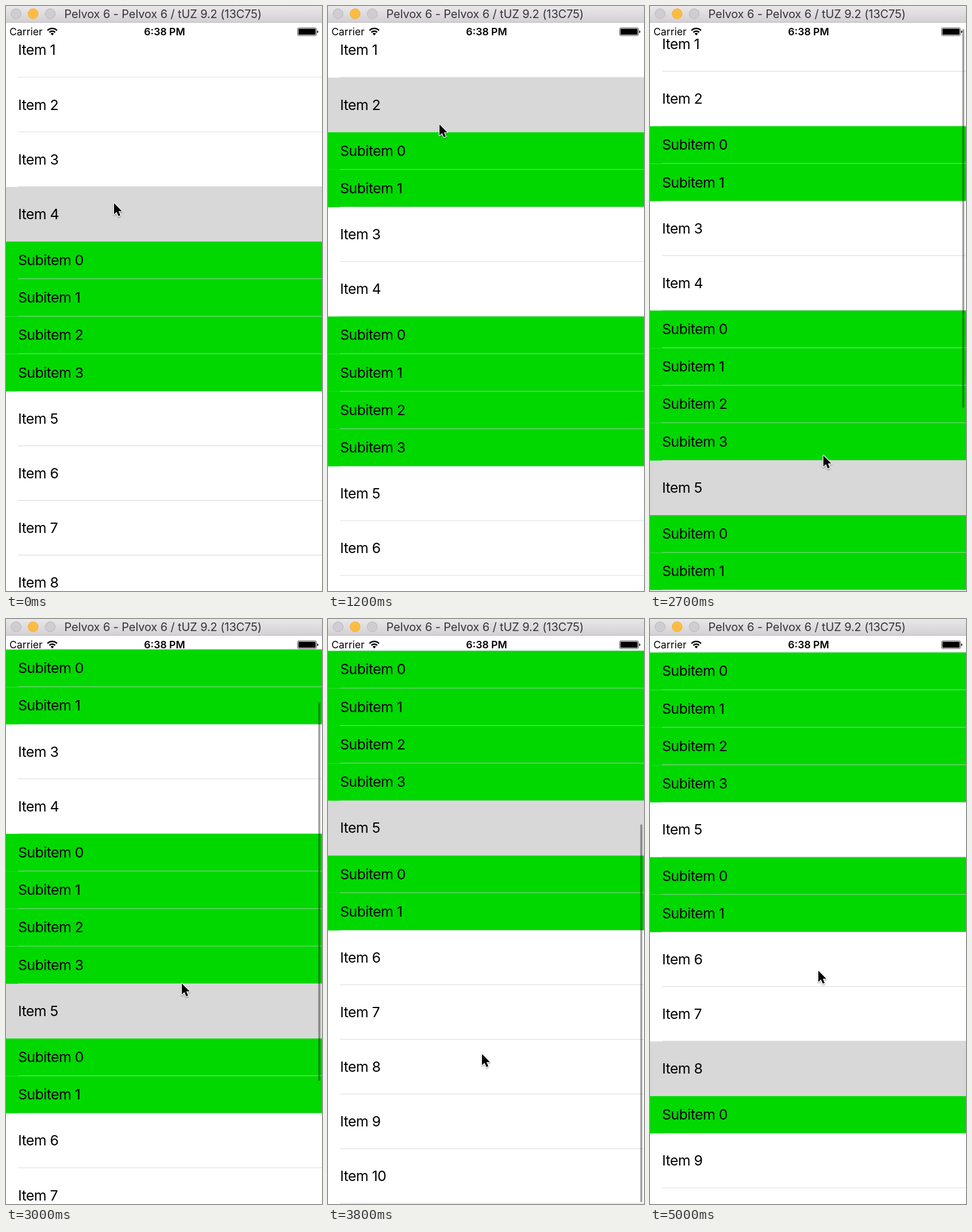
Animation of 550 by 1018 pixels, one loop 5100 ms. Source, as an HTML page:

```html
<!DOCTYPE html>
<html lang="en">
<head>
<meta charset="utf-8">
<title>Expandable list</title>
<style>
  html, body { margin: 0; width: 100%; height: 100%; overflow: hidden; background: #fff; }
  svg { display: block; width: 100%; height: 100%; }
  text { font-family: Inter, "Open Sans", sans-serif; }
  #list text { font-size: 24.9px; letter-spacing: -.54px; }
  .status { font-size: 17.6px; }
</style>
</head>
<body>
<svg viewBox="0 0 550 1018">
  <defs>
    <linearGradient id="bar" x2="0" y2="1">
      <stop offset="0" stop-color="#e9e7e9"/>
      <stop offset="1" stop-color="#d2d0d2"/>
    </linearGradient>
    <clipPath id="screen"><rect y="29" width="550" height="989"/></clipPath>
    <filter id="shadow" x="-50%" y="-50%" width="200%" height="200%">
      <feDropShadow dx="0" dy="1.5" stdDeviation="1.3" flood-opacity=".4"/>
    </filter>
  </defs>
  <rect width="550" height="1018" fill="#fff"/>
  <g clip-path="url(#screen)">
    <g id="list"></g>
    <rect id="thumb" x="543.5" width="3.6" rx="1.8" fill="#000" fill-opacity=".37"/>
  </g>

  <text class="status" x="6" y="51">Carrier</text>
  <g fill="none" stroke="#000" stroke-width="2.5">
    <path d="M72.2 42.6a11.6 11.6 0 0 1 16.6 0M75.5 45.9a7 7 0 0 1 10 0"/>
    <path d="M77.6 48.1a4.1 4.1 0 0 1 5.8 0L80.5 51.2z" fill="#000" stroke="none"/>
  </g>
  <text class="status" x="276" y="51" text-anchor="middle" font-weight="600">6:38 PM</text>
  <rect x="507.4" y="38" width="33" height="13.6" rx="2.6" fill="none" stroke="#000" stroke-opacity=".7"/>
  <rect x="508.9" y="39.5" width="30" height="10.6" rx="1.3"/>
  <path d="M541.6 42.4q2 .6 2 2.4t-2 2.4z"/>

  <rect width="550" height="29" fill="url(#bar)"/>
  <rect y="28" width="550" height="1" fill="#b9b7b9"/>
  <g fill="#cfcdcf" stroke="#b8b6b8">
    <circle cx="17.5" cy="13.5" r="8.7"/>
    <circle cx="47.2" cy="13.5" r="8.7" fill="#fdbc40" stroke="#f0b03e"/>
    <circle cx="77" cy="13.5" r="8.7"/>
  </g>
  <text x="273.3" y="21" text-anchor="middle" font-size="20" letter-spacing="-.12" fill="#363436">Pelvox 6 - Pelvox 6 / tUZ 9.2 (13C75)</text>

  <path id="cursor" d="M1 1V20.4L5.5 16.2L8.7 23.6L12 22.2L8.9 14.9H14.8Z" stroke="#fff" stroke-width="2.4"
    stroke-linejoin="round" paint-order="stroke" filter="url(#shadow)"/>
</svg>
<script>
const LOOP = 5100, STEP = 100;
const ITEM = 95.07, SUB = 65.27, TOP = 29.5, END = 482;
const list = document.getElementById('list');
const thumb = document.getElementById('thumb');
const cursor = document.getElementById('cursor');

// Item number -> count of subitems and the time they open
const subs = {
  2: { count: 2, at: 850 },
  4: { count: 4, at: -1000 },
  5: { count: 2, at: 2029 },
  8: { count: 1, at: 4425 }
};
// Taps: time, item
const taps = [[0, 4], [800, 2], [2000, 5], [4400, 8]];
// Pointer: time, x, y
const path = [
  [0, 187, 342], [150, 187, 342], [700, 193, 205], [1250, 193, 205],
  [1800, 267, 867], [2350, 267, 867], [2600, 300, 791], [3000, 305, 633],
  [3300, 307, 394], [3400, 307, 372], [3800, 267, 756], [4500, 270, 768], [5000, 292, 611]
];

const clamp = v => Math.min(1, Math.max(0, v));
const ease = v => (1 - Math.cos(Math.PI * clamp(v))) / 2;

// Accelerating drag, steady flick, then a critically damped bounce at the end
function scrollAt(t) {
  if (t < 2600) return 0;
  if (t < 3000) return 166.5 * ((t - 2600) / 400) ** 2;
  const hit = 3000 + (END - 166.5) / .841;
  if (t < hit) return 166.5 + .841 * (t - 3000);
  const d = t - hit;
  return END + .841 * d * Math.exp(-.01135 * d);
}

function pointerAt(t, scroll) {
  let i = 0;
  while (i < path.length - 2 && path[i + 1][0] <= t) i++;
  const [t0, x0, y0] = path[i], [t1, x1, y1] = path[i + 1];
  const k = ease((t - t0) / (t1 - t0));
  const dragging = t >= 2600 && t <= 3300;
  return [x0 + (x1 - x0) * k, dragging ? 791 - .948 * scroll : y0 + (y1 - y0) * k];
}

function row(label, y, h, { fill = '#fff', alpha = 1, picked = false } = {}) {
  if (y > 1018 || y + h < 29) return '';
  const line = picked ? '' :
    `<rect x="21" y="${y + h - 1}" width="529" height="1" fill="#c8c7cc" opacity=".8"/>`;
  return `<g opacity="${alpha}"><rect y="${y}" width="550" height="${h}" fill="${fill}"/>` +
    `${line}<text x="20.9" y="${y + h / 2 + 8.4}">${label}</text></g>`;
}

function drawList(t, scroll) {
  const picked = taps.filter(tap => tap[0] <= t).pop()[1];
  let y = TOP - scroll, rows = '', opening = '';
  for (let n = 1; n <= 10; n++) {
    const on = n === picked;
    rows += row('Item ' + n, y, ITEM, { fill: on ? '#d8d8d8' : '#fff', picked: on });
    y += ITEM;
    if (!subs[n]) continue;
    const { count, at } = subs[n], p = ease((t - at) / 300);
    for (let k = 0; k < count && p > 0; k++) {
      const cell = row('Subitem ' + k, y + k * SUB * p, SUB, { fill: '#00d800', alpha: p });
      if (p < 1) opening += cell; else rows += cell;
    }
    y += count * SUB * p;
  }
  list.innerHTML = rows + opening;
}

function draw(t) {
  const scroll = scrollAt(t);
  drawList(t, scroll);
  const top = 33 + .669 * scroll;
  thumb.setAttribute('y', top);
  thumb.setAttribute('height', Math.min(659.5, 1015 - top));
  thumb.setAttribute('opacity', t > 2600 ? 1 - clamp((t - 4000) / 250) : 0);
  cursor.setAttribute('transform', `translate(${pointerAt(t, scroll)})`);
}

// The picture advances in steps of 100 ms
const start = performance.now();
let last = -1;
function tick() {
  const t = Math.floor(((performance.now() - start) % LOOP) / STEP) * STEP;
  if (t !== last) draw(last = t);
  requestAnimationFrame(tick);
}
tick();
</script>
</body>
</html>
```
